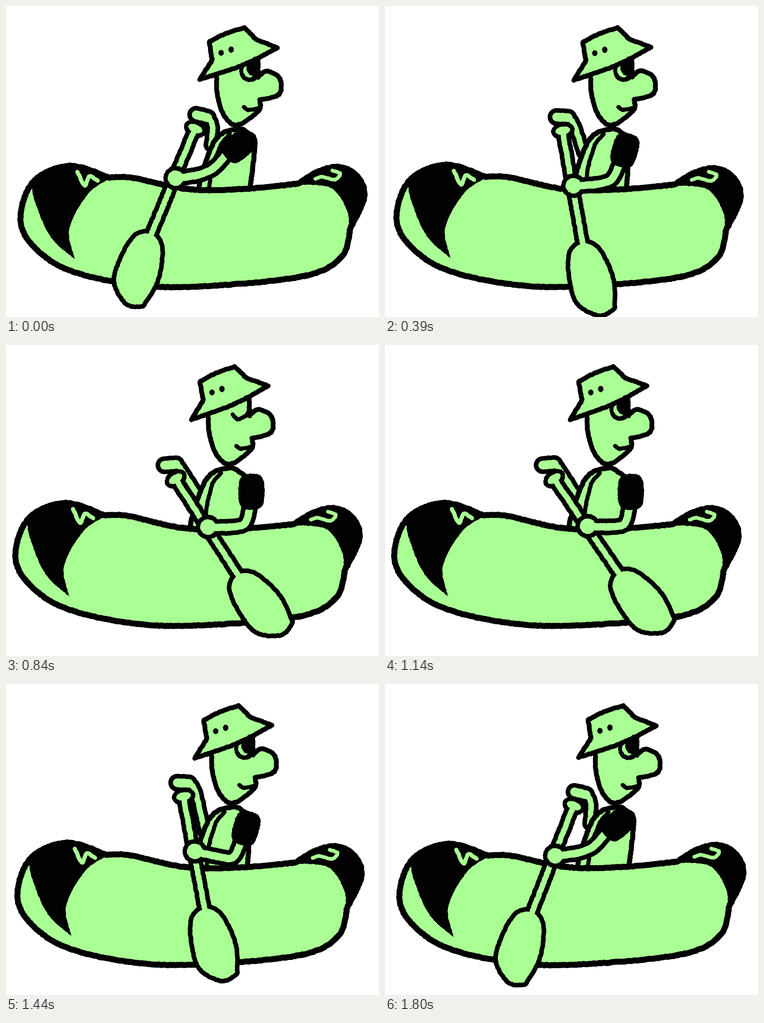
An HTML page with a canvas that plays this animation: 820 by 683 pixels, repeating every 1.86 s.

```html
<!DOCTYPE html>
<html lang="en">
<head>
<meta charset="utf-8">
<title>Paddling</title>
<style>
  html, body { margin: 0; width: 100%; height: 100%; overflow: hidden; background: #fff; }
  canvas { display: block; width: 100vw; height: 100vh; }
</style>
</head>
<body>
<canvas id="stage" width="820" height="683"></canvas>
<script>
const ctx = document.getElementById('stage').getContext('2d');
const GREEN = '#aaff94', INK = '#020202';
const LOOP = 1860, STEPS = 25, TURN = 14;

const rad = deg => deg * Math.PI / 180;
const mix = (a, b, u) => a + (b - a) * u;
const ease = u => .5 - .5 * Math.cos(Math.PI * u);
const noise = n => { const v = Math.sin(n * 12.9898) * 43758.5453; return v - Math.floor(v) - .5; };

// Rough-edged spline through [x, y] points; a third entry marks a sharp corner.
function trace(pts, closed) {
  const n = pts.length;
  const at = i => closed ? pts[(i + n) % n] : pts[Math.max(0, Math.min(n - 1, i))];
  let seed = n;
  ctx.beginPath();
  for (let i = 0; i < (closed ? n : n - 1); i++) {
    const b = at(i), c = at(i + 1);
    const a = b[2] ? b : at(i - 1), d = c[2] ? c : at(i + 2);
    const count = Math.ceil(Math.hypot(c[0] - b[0], c[1] - b[1]) / 3.5);
    for (let j = 0; j <= count; j++) {
      const u = j / count, w = 1 - u;
      const spot = [0, 1].map(x => {
        const p = b[x] + (c[x] - a[x]) / 6, q = c[x] - (d[x] - b[x]) / 6;
        return b[x] * w ** 3 + 3 * p * w * w * u + 3 * q * w * u * u + c[x] * u ** 3
          + noise(++seed) * 1.5;
      });
      ctx.lineTo(...spot);
    }
  }
  if (closed) ctx.closePath();
}

function stroke(width, color) {
  ctx.lineWidth = width;
  ctx.strokeStyle = color;
  ctx.stroke();
}

function line(pts, width, color = INK) {
  trace(pts, false);
  stroke(width, color);
}

function shape(pts, fill, width = 0, edge = INK) {
  trace(pts, true);
  ctx.fillStyle = fill;
  ctx.fill();
  if (width) stroke(width, edge);
}

// Superellipse; a power above 2 squares it off.
function oval(x, y, rx, ry, fill, power = 2) {
  const bend = v => Math.sign(v) * Math.abs(v) ** (2 / power);
  shape(Array.from({ length: 16 }, (_, i) => {
    const a = rad(i * 22.5);
    return [x + rx * bend(Math.cos(a)), y + ry * bend(Math.sin(a))];
  }), fill);
}

// Draws joined parts twice, so that one outline runs round all of them.
function outlined(draw, width = 10) {
  draw(INK, width);
  draw(GREEN, 0);
}

function placed(x, y, angle, draw) {
  ctx.save();
  ctx.translate(x, y);
  ctx.rotate(angle);
  draw();
  ctx.restore();
}

// Point given in the axes of a tilted part.
function project({ x, y, tilt }, dx, dy) {
  const c = Math.cos(rad(tilt)), s = Math.sin(rad(tilt));
  return [x + dx * c - dy * s, y + dx * s + dy * c];
}

// The paddle sweeps back low and returns in a higher arc.
function poseAt(step) {
  const pulling = step < TURN;
  const lean = pulling ? ease((step / TURN) ** .6) : 1 - ease((step - TURN) / (STEPS - TURN));
  const arc = (pulling ? 11 : 39) * Math.sin(Math.PI * lean);
  return {
    lean,
    paddle: { x: mix(415, 371, lean), y: mix(270, 298, lean) - arc, tilt: mix(22.7, -35.5, lean) },
    sleeve: { x: mix(510, 541, lean), y: mix(309, 323, lean), tilt: 50 * (1 - lean) ** 1.4 },
    blinking: Math.abs(step - 11) <= 1
  };
}

function drawFarArm({ lean, paddle }) {
  const x = paddle.x + mix(3, -26, lean), y = paddle.y - 31;
  const knuckle = [x + 26, y + mix(6, -3, lean)], bend = [x + mix(36, 45, lean), y + mix(27, 21, lean)];
  const shoulder = [mix(451, 427, lean), mix(306, 340, lean)];
  outlined((color, grow) => {
    line([[x, y], knuckle], 19 + 2 * grow, color);
    line([[x, y], knuckle, bend, shoulder], 12 + 2 * grow, color);
  });
}

function drawTorso({ lean }) {
  const d = -20 * lean;
  shape([
    [508 + d, 270], [463 + d, 290], [433 + d, 362], [422 + d, 410, 1],
    [535 - 9 * lean, 410, 1], [547 + d, 302], [532 + d, 279]
  ], GREEN, 11);
  line([[492 + d, 281], [474 + d, 303], [mix(455, 442, lean), 350], [mix(447, 438, lean), 397]], 9);
}

function drawEye(blinking) {
  if (blinking) {
    line([[517, 152], [527, 163], [546, 156], [553, 142]], 9);
    return;
  }
  oval(536, 143, 23, 24, INK);
  oval(535, 142, 13, 15, GREEN);
  oval(544, 135, 15, 19, INK);
}

function drawHead({ lean, blinking }) {
  placed(520 - 19.5 * lean, 150, -.03 * lean, () => {
    ctx.translate(-520, -150);
    shape([
      [464, 120, 1], [464, 190], [481, 243], [510, 261], [555, 230], [558, 206, 1],
      [600, 194], [602, 160], [574, 143], [554, 156, 1], [554, 118, 1]
    ], GREEN, 10.5);
    drawEye(blinking);
    line([[523, 222], [533, 228], [556, 225]], 9);
    shape([
      [447, 78, 1], [487, 59], [525, 48, 1], [549, 73, 1], [596, 92, 1], [520, 130],
      [426, 161, 1], [453, 119, 1]
    ], GREEN, 10.5);
    oval(473, 103, 6, 6.5, INK);
    oval(495, 96, 6, 7, INK);
  });
}

function drawBoat({ lean }) {
  placed(410 - 11.5 * lean, 450, .016 * lean, () => {
    ctx.translate(-410, -450);
    shape([
      [228, 377, 1], [275, 377], [400, 402], [520, 402], [643, 390, 1], [685, 364], [732, 353],
      [771, 373], [788, 418], [757, 488, 1], [738, 550], [660, 592], [460, 614], [300, 614],
      [140, 581], [55, 522], [32, 460], [62, 384], [140, 351]
    ], GREEN, 13);
    shape([
      [57, 400], [95, 502], [152, 557, 1], [139, 490], [180, 413], [228, 379, 1], [140, 351], [85, 364]
    ], INK);
    shape([
      [643, 392, 1], [715, 400], [750, 450], [753, 492, 1], [787, 420], [771, 373], [732, 353], [685, 364]
    ], INK);
    line([[157, 364], [173, 394], [183, 374], [202, 384]], 9, GREEN);
    line([[680, 380], [693, 375], [722, 381], [735, 368], [717, 362]], 8, GREEN);
  });
}

function drawPaddle({ paddle }) {
  placed(paddle.x, paddle.y, rad(paddle.tilt), () => outlined((color, grow) => {
    line([[0, 0], [1, 258]], 12 + 2 * grow, color);
    oval(1, -1, 16 + grow, 9 + grow, color);
    shape([
      [0, 250], [-28, 270], [-36, 320], [-30, 376], [10, 408], [41, 400, 1], [49, 338], [31, 271]
    ], color, 2 * grow, color);
  }));
}

function drawNearArm({ lean, paddle, sleeve }) {
  const hand = project(paddle, 3, mix(116, 127, lean));
  const cuff = project(sleeve, -3, 32);
  const elbow = [cuff[0] - mix(27, 10, lean), cuff[1] + mix(29, 38, lean)];
  const wrist = [mix(hand[0], elbow[0], .5) + 6, mix(hand[1], elbow[1], .5) + 4];
  outlined((color, grow) => {
    line([hand, wrist, elbow, cuff], 16 + 2 * grow, color);
    oval(...hand, 17 + grow, 17 + grow, color);
  });
  placed(sleeve.x, sleeve.y, rad(sleeve.tilt), () =>
    oval(0, 0, 29, mix(36, 40, lean), INK, 3));
}

function render(now) {
  const t = now % LOOP;
  // Holds alternate between 90 and 60 ms.
  const pose = poseAt(2 * Math.floor(t / 150) + (t % 150 >= 90));

  ctx.fillStyle = '#fff';
  ctx.fillRect(0, 0, 820, 683);
  ctx.lineCap = ctx.lineJoin = 'round';
  for (const draw of [drawFarArm, drawTorso, drawHead, drawBoat, drawPaddle, drawNearArm]) draw(pose);
  requestAnimationFrame(render);
}
render(performance.now());
</script>
</body>
</html>
```
